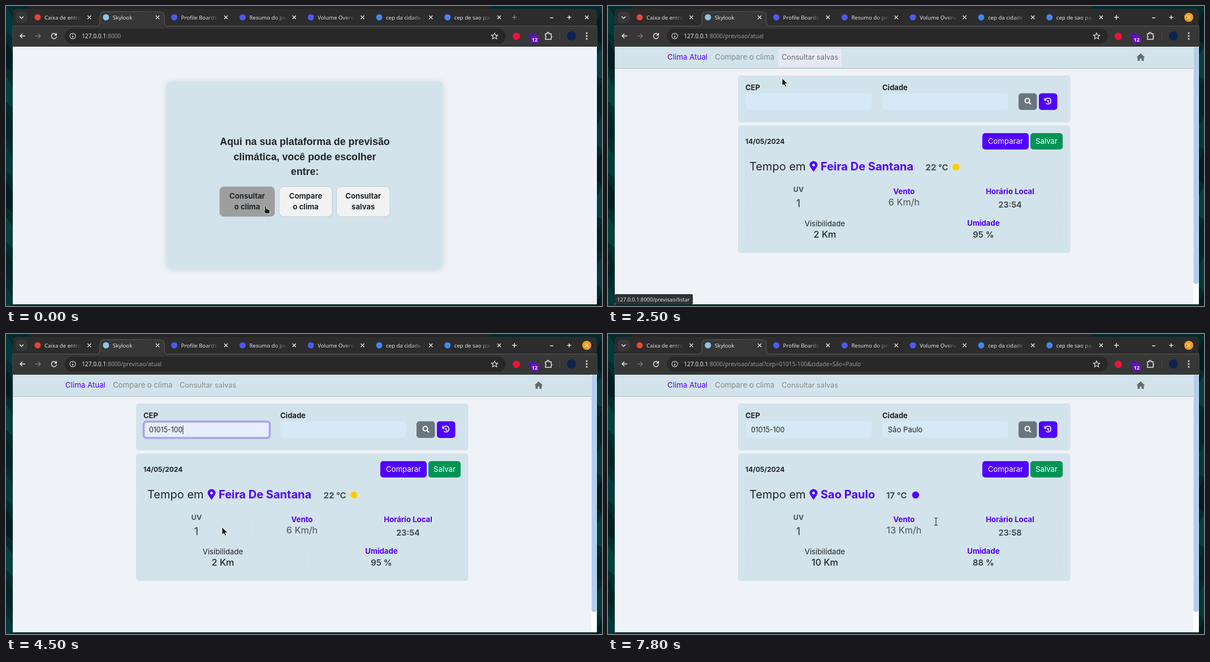
An HTML page that plays this animation: 1054x531 px, repeating every 8000 ms.

```html
<!DOCTYPE html>
<html lang="pt">
<head>
<meta charset="utf-8">
<title>Clima</title>
<style>
html, body { margin: 0; width: 100%; height: 100%; overflow: hidden; background: #03282a; }
svg { display: block; width: 1054px; height: 531px; }
text { white-space: pre; }
.ui { font-family: "Noto Sans", sans-serif; }
.page { font-family: Inter, sans-serif; }
.arial { font-family: "Liberation Sans", Arial, sans-serif; }
.line { fill: none; stroke: #e3e3e3; stroke-width: 1.5; }
.mid { text-anchor: middle; }
</style>
</head>
<body>
<svg id="stage" viewBox="0 0 1054 531"></svg>
<script>
const PURPLE = '#5200ff', PANEL = '#d3e3eb', FIELD = '#d5eaf6', STRIP = '#2c2c2c', BAR = '#373737';
const INK = '#212529', GREY = '#495057';

const rect = (x, y, x2, y2, fill, r = 0, attrs = '') =>
  `<rect x="${x}" y="${y}" width="${x2 - x}" height="${y2 - y}" rx="${r}" fill="${fill}" ${attrs}/>`;
const dot = (x, y, r, fill, attrs = '') => `<circle cx="${x}" cy="${y}" r="${r}" fill="${fill}" ${attrs}/>`;
const text = (x, y, str, size, fill, cls = 'page', weight = 400, id = '') =>
  `<text id="${id}" x="${x}" y="${y}" font-size="${size}" fill="${fill}" class="${cls}" font-weight="${weight}">${str}</text>`;
const line = (d, attrs = '') => `<path class="line" d="${d}" ${attrs}/>`;
const group = (id, ...parts) => `<g id="${id}">${parts.join('')}</g>`;
const cross = (x, y, r, attrs = '') => line(`M${x - r} ${y - r}l${2 * r} ${2 * r}m0 ${-2 * r}l${-2 * r} ${2 * r}`, attrs);

function desktop() {
  const shades = ['#04383a', '#021d20', '#053f3e', '#022427'];
  let out = rect(0, 0, 1054, 531, '#032b2d');
  for (let i = 0; i < 9; i++) {
    const y = i * 62;
    out += `<path fill="${shades[i % 4]}" d="M0 ${y}l14 24v34l-14-12z"/>`;
    out += `<path fill="${shades[(i + 1) % 4]}" d="M1054 ${y + 10}l-12 20v30l12 8z"/>`;
  }
  return out + rect(40, 0, 857, 5, '#242424', 3);
}

function tabs() {
  const titles = ['Caixa de entraç', 'Skylook', 'Profile Boards', 'Resumo do perf', 'Volume Overvie', 'cep da cidade d', 'cep de sao paul'];
  const icons = ['#ea4335', '#8fc3e8', '#4b59f2', '#4b59f2', '#4b59f2', '#4285f4', '#4285f4'];
  let out = `<path fill="${BAR}" stroke="#5c5c5c" d="M12 35.5H158q8 0 8-8V18q0-8 8-8H272q8 0 8 8v9.500q0 8 8 8H1045V73H12z"/>`;
  titles.forEach((title, i) => {
    const x = 68 + i * 120.8, fade = i === 1 ? 'fadeOn' : 'fadeOff';
    out += text(x, 24, title, 9.6, '#e4e4e4', 'ui', 400, 'title' + i);
    out += rect(x + 44, 10, x + 72, 30, `url(#${fade})`);
    out += dot(x - 12, 20, 5.5, icons[i], `id="icon${i}"`);
    out += cross(x + 79.300, 20, 3);
  });
  return out;
}

const browser = () => [
  `<path fill="${STRIP}" d="M12 528V13q0-8 8-8H1037q8 0 8 8V528z"/>`,
  tabs(),
  rect(17, 10, 38, 30, '#383838', 6), line('M24 18.500l3.500 3.500 3.500-3.500'),
  line('M895 20h8m-4-4v8', 'id="newTab"'),
  line('M962 21h6M992.500 20h7m-3.500-3.500v7'),
  dot(1027, 20, 8, '#f59b1e', 'id="closeDot"'), cross(1027, 20, 3, 'stroke="#fff"'),
  rect(12, 36, 1045, 72, BAR),
  line('M34 53h-9m4-4l-4 4 4 4'),
  line('M52 53h9m-4-4l4 4-4 4', 'style="stroke:#777"'),
  group('reload', line('M88.500 50.200a4.600 4.600 0 1 0 1 4'), '<path fill="#e3e3e3" d="M90 47.500v5h-5z"/>'),
  group('stop', cross(85, 53, 3.7)),
  rect(104, 40, 884, 67, '#282828', 13.5),
  dot(118, 53, 5, 'none', 'stroke="#ccc" stroke-width="1.200"'), line('M118 52.500v3.500M118 49.500v1.500'),
  `<text x="134" y="57" class="ui" font-size="10.2" fill="#999"><tspan fill="#e6e6e6">127.0.0.1</tspan><tspan id="path"></tspan></text>`,
  line('M864 47.700l1.600 3.700 4 .3-3 2.600 1 4-3.600-2.200-3.600 2.200 1-4-3-2.600 4-.3z', 'style="stroke-width:1.200"'),
  dot(902.500, 53.500, 6.5, '#ed1238'),
  dot(930, 53, 5.5, '#5410b8'),
  group('badge', rect(928, 53, 942, 65, '#6a0fd0', 3), text(935, 62.5, '12', 9, '#fff', 'ui mid', 700)),
  line('M954 49h3v-1.500q1.500-2 3 0V49h4v4q2.500 1.500 0 3v3h-10v-3q2.500-1.500 0-3z'),
  rect(979, 46, 980, 60, '#4a4a4a'),
  dot(1000, 53, 8, '#0c2350'),
  [48, 53, 58].map(y => dot(1027, y, 1.5, '#e3e3e3')).join(''),
  rect(12, 72, 1045, 528, '#eff3f8')
].join('');

const choice = (x, x2, fill, top, bottom) => rect(x, 319.5, x2, 373, fill, 8, 'stroke="#bfcbd1"') +
  text((x + x2) / 2, 341, top, 13.1, INK, 'page mid', 700) +
  text((x + x2) / 2, 359.5, bottom, 13.1, INK, 'page mid', 700);

const home = () => group('home',
  rect(284, 134, 772.5, 465, PANEL, 8, 'style="filter:drop-shadow(0 1px 6px #0002)"'),
  ['Aqui na sua plataforma de previsão', 'climática, você pode escolher', 'entre:'].map((s, i) =>
    text(528.500, 246 + i * 26.700, s, 17.8, INK, 'arial mid', 700)).join(''),
  choice(377.500, 475.500, '#9e9e9e', 'Consultar', 'o clima'),
  choice(483, 577, '#f2f2f2', 'Compare', 'o clima'),
  choice(584.500, 679, '#f2f2f2', 'Consultar', 'salvas'));

const forecast = () => group('forecast',
  rect(12, 72, 1035, 110, PANEL), rect(12, 110, 1035, 111, '#a5b5c1'),
  rect(1035, 72, 1045, 528, '#fff'), rect(1035.500, 72, 1044.500, 492, '#b2cdef', 4),
  rect(301, 76, 413, 107, '#e6e9f4', 0, 'id="navHover"'),
  text(105, 95, 'Clima Atual', 13.3, PURPLE), text(189, 95, 'Compare o clima', 13.2, '#858b90'),
  text(307, 95, 'Consultar salvas', 12.8, '#858b90', 'page', 400, 'navList'),
  rect(230, 123, 817.500, 206, PANEL, 5), rect(230, 211.500, 817.500, 437, PANEL, 5),
  text(243, 149, 'CEP', 13, INK, 'page', 700), text(485, 149, 'Cidade', 13, INK, 'page', 700),
  rect(243.500, 155, 466.500, 184, FIELD, 5, 'id="cepBox"'),
  rect(485.500, 155, 707.500, 184, FIELD, 5, 'id="cityBox"'),
  text(253, 173.5, '', 12.4, INK, 'page', 400, 'cep'),
  text(253, 173.5, '', 10.5, '#000', 'arial', 400, 'preview'),
  text(495, 173.5, '', 13, INK, 'page', 400, 'city'),
  rect(312.500, 162, 313.500, 177, INK, 0, 'id="caret"'),
  rect(726, 154.500, 758.500, 184, '#6c757d', 5, 'id="search"'),
  rect(762, 154.500, 794.500, 184, PURPLE, 5, 'id="history"'),
  text(243, 243.5, '14/05/2024', 12, INK, 'page', 700),
  rect(662, 225, 744, 254, PURPLE, 5), text(703, 244, 'Comparar', 13.2, '#fff', 'page mid'),
  rect(747, 225, 804, 254, '#009355', 5), text(775.500, 244, 'Salvar', 13.2, '#fff', 'page mid'),
  line('M243.500 266.500V303M246.500 318V364M428.500 318V360M800.500 318V364M246.500 376V414M520.500 376V416M527.500 376V416M800.500 376V414', 'style="stroke:#cedfe8;stroke-width:1"'),
  text(250, 291, 'Tempo em', 20, INK), text(376, 291, '', 20, PURPLE, 'page', 700, 'place'),
  text(0, 290.5, '', 15, GREY, 'page', 700, 'temp'), dot(0, 285, 6.5, '', 'id="sky" stroke="#fff8" stroke-width=".7"'),
  text(337, 328.5, 'UV', 12.4, GREY, 'page mid', 700), text(336.500, 356, '1', 18, GREY, 'page mid', 500),
  text(523.500, 333, 'Vento', 13.2, PURPLE, 'page mid', 700), text(523.500, 353, '', 16.3, GREY, 'page mid', 400, 'wind'),
  text(711, 333, 'Horário Local', 13.2, PURPLE, 'page mid', 700), text(711, 357, '', 14.3, GREY, 'page mid', 700, 'clock'),
  text(383.500, 390, 'Visibilidade', 13.2, INK, 'page mid'), text(383.500, 410, '', 16.2, INK, 'page mid', 500, 'sight'),
  text(664, 389, 'Umidade', 13.2, PURPLE, 'page mid', 700), text(664, 409.5, '', 15, INK, 'page mid', 500, 'humid'),
  group('glyphs',
    '<path fill="#62686c" d="M942 84l7.500 7h-2v6h-4v-4h-3v4h-4v-6h-2z"/>',
    dot(741.500, 167.500, 4, 'none', 'stroke="#fff" stroke-width="2"'),
    line('M744.500 170.500l3.500 3.500', 'style="stroke:#fff;stroke-width:2.200"'),
    line('M773.500 165.500a5.300 5.300 0 1 1 .8 6.500M778 166v3.500l2.300 1.500', 'style="stroke:#fff;stroke-width:1.600"'),
    '<path fill="#fff" d="M771.500 162.500v5h5z"/>',
    `<path fill="${PURPLE}" fill-rule="evenodd" d="M363.500 293.500Q356.500 284 356.500 281.500a7 7 0 0 1 14 0Q370.500 284 363.500 293.500zM363.500 279a2.500 2.500 0 1 0 .01 0z"/>`));

const ZIPS = ['44006-460', '20210-010', '40470-805', '01153-000', '22041-011', '01015-100'];
const dropdown = () => group('dropdown',
  '<path fill="#292929" d="M330 191l6-6 6 6z"/>', rect(320, 191, 440.500, 364, '#292929', 5),
  group('rowMark', rect(322.500, 194, 437.500, 222, '#84f0ec', 3), cross(424, 208.500, 3, 'style="stroke:#a3c9c8"')),
  ZIPS.map((zip, i) => text(329, 213 + i * 27.800, zip, 11, '#c9c9c9', 'ui', 400, 'row' + i)).join(''));

const pointers = () => group('pointer',
  '<path id="arrow" fill="#111" stroke="#fff" stroke-width=".9" d="M0 0V13.500l3.200-3 2 4.700 2.400-1-2-4.600h4.400z"/>',
  '<path id="hand" fill="#111" stroke="#fff" stroke-width=".8" d="M0 .5q1.500-1.500 2.500 0l1 4.500 5 1.500q1.500.5 1 2.500l-.7 4.500H2.500L-1.500 8.500q.5-1.500 2.500 0z"/>',
  '<path id="ibeam" fill="none" stroke="#333" stroke-width="1.200" d="M-3-6.500q3 0 3 2 0-2 3-2M0-5V5M-3 6.500q3 0 3-2 0 2 3 2"/>');

const gradient = (id, color) => `<linearGradient id="${id}"><stop stop-color="${color}" stop-opacity="0"/><stop offset=".8" stop-color="${color}"/></linearGradient>`;

document.getElementById('stage').innerHTML =
  `<defs>${gradient('fadeOn', BAR)}${gradient('fadeOff', STRIP)}</defs>` +
  desktop() + browser() +
  group('globe', dot(177, 20, 5.5, '#8d9194'), line('M172 20h10M177 15q-4 5 0 10q4-5 0-10', 'style="stroke:#4a4e50;stroke-width:1"')) +
  line('M177 14.500a5.500 5.500 0 0 0-5.500 5.500', 'id="spinner" style="stroke:#a9b4c4"') +
  home() + forecast() + dropdown() +
  group('status', rect(12, 510, 150, 528, '#303134', 2), text(16, 522.5, '', 9.3, '#e0e0e0', 'ui', 400, 'statusText')) +
  pointers();

const $ = id => document.getElementById(id);
const show = (id, on) => { $(id).style.display = on ? '' : 'none'; };
const write = (id, str) => { if ($(id).textContent !== str) $(id).textContent = str; };
const set = (id, attrs) => { for (const k in attrs) $(id).setAttribute(k, attrs[k]); };
const latest = (keys, t) => keys.filter(k => k[0] <= t).pop();

// Pointer steps: time, x, y, shape
const MOVES = [
  [0, 457, 354, 'hand'], [1500, 430, 300, 'arrow'], [1600, 380, 190, 'arrow'], [1700, 330, 115, 'arrow'],
  [1800, 312, 97, 'hand'], [2300, 309, 114, 'arrow'], [2500, 308, 128, 'arrow'],
  [3200, 330, 169, 'ibeam'], [3400, 352, 204, 'arrow'], [3500, 360, 231, 'arrow'], [3700, 391, 290, 'arrow'],
  [3900, 393, 350, 'arrow'], [4100, 388, 347, 'arrow'], [4200, 382, 342, 'arrow'],
  [4800, 490, 295, 'arrow'], [4900, 690, 222, 'arrow'], [5000, 824, 181, 'arrow'],
  [5200, 790, 177, 'arrow'], [5300, 747, 174, 'arrow'], [5800, 739, 173, 'arrow'],
  [7400, 680, 215, 'arrow'], [7500, 570, 280, 'arrow'], [7600, 492, 318, 'ibeam'],
  [7700, 540, 330, 'ibeam'], [7800, 580, 332, 'ibeam']
];
const ROWS = [[0, -1], [3400, 0], [3500, 1], [3700, 2], [3900, 5]];

function render(t) {
  const between = (a, b) => t >= a && t < b;
  const onForecast = t >= 1500, result = t >= 6900;
  const waiting = between(600, 1500) || between(6000, 6900);
  const fresh = between(1500, 2100) || between(6900, 7200);
  const bare = between(1500, 2300) || between(6900, 7200);

  set('newTab', { style: `stroke:${t < 600 ? '#777' : '#e3e3e3'}` });
  show('closeDot', t >= 600);
  show('icon1', !waiting && !fresh);
  show('globe', fresh);
  show('spinner', waiting);
  set('spinner', { transform: `rotate(${Math.floor(t / 100) * 36 - 2412} 177 20)` });
  write('title1', fresh ? '127.0.0.1:8000/p' : 'Skylook');
  show('reload', !waiting && !fresh);
  show('stop', waiting || fresh);
  show('badge', !fresh);
  write('path', ':8000' + (onForecast ? '/previsao/atual' : '') + (result ? '?cep=01015-100&cidade=São+Paulo' : ''));

  show('home', !onForecast);
  show('forecast', onForecast);
  show('glyphs', !bare);
  show('status', between(300, 1500) || between(2100, 3200));
  write('statusText', '127.0.0.1:8000/previsao/' + (onForecast ? 'listar' : 'atual'));
  const navHover = between(2300, 3200);
  show('navHover', navHover);
  set('navList', { fill: navHover ? '#666b70' : '#858b90' });

  const row = latest(ROWS, t)[1], picking = between(3200, 4500);
  show('dropdown', picking);
  show('rowMark', row >= 0);
  set('rowMark', { transform: `translate(0 ${row * 27.8})` });
  ZIPS.forEach((_, i) => set('row' + i, { fill: i === row ? '#8fd2cf' : '#c9c9c9' }));

  const focused = between(3200, 6000), checked = between(6000, 6900);
  set('cepBox', {
    fill: between(3400, 6900) ? '#e8eefe' : FIELD,
    stroke: focused ? '#aaa0f2' : checked ? '#173a20' : 'none',
    'stroke-width': focused ? 3.6 : 1
  });
  set('cityBox', { stroke: checked ? '#173a20' : 'none' });
  write('preview', picking && row >= 0 ? ZIPS[row] : '');
  write('cep', t >= 4500 ? '01015-100' : '');
  write('city', t >= 4600 ? 'São Paulo' : '');
  set('city', { fill: checked ? '#1d6a35' : INK });
  show('caret', between(4500, 5000) || between(5600, 6000));

  set('search', { width: bare ? 29.5 : 32.5, fill: between(5600, 7400) ? '#5c636a' : '#6c757d' });
  set('history', { x: bare ? 759 : 762, width: bare ? 30 : 32.5 });

  write('place', result ? 'Sao Paulo' : 'Feira De Santana');
  write('temp', result ? '17 °C' : '22 °C');
  set('temp', { x: result ? 492 : 561.5 });
  set('sky', { cx: result ? 544 : bare ? 616 : 615.3, fill: result ? PURPLE : '#ffcc00' });
  write('wind', result ? '13 Km/h' : '6 Km/h');
  write('clock', result ? '23:58' : '23:54');
  write('sight', result ? '10 Km' : '2 Km');
  write('humid', result ? '88 %' : '95 %');

  const [, x, y, shape] = latest(MOVES, t);
  set('pointer', { transform: `translate(${x} ${y})` });
  ['arrow', 'hand', 'ibeam'].forEach(id => show(id, id === shape));
}

const start = performance.now();
function tick() {
  render((performance.now() - start) % 8000);
  requestAnimationFrame(tick);
}
tick();
</script>
</body>
</html>
```
